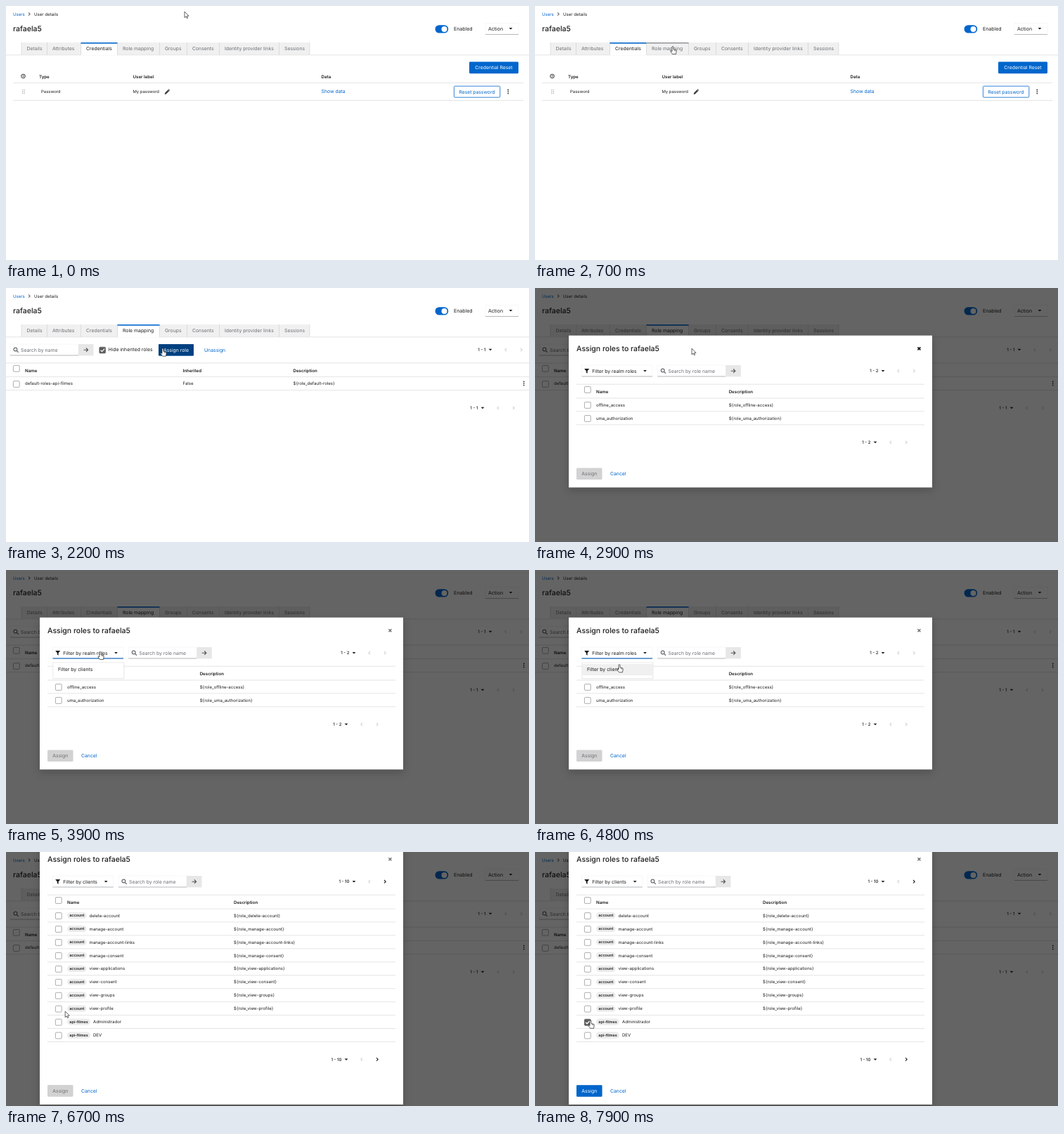
Recreate the animation shown at these times as an HTML page. Size 744x362 px, loop 8 s.

```html
<!DOCTYPE html>
<html lang="en">
<head>
<meta charset="utf-8">
<title>Assign roles</title>
<style>
  html, body { margin: 0; width: 100%; height: 100%; overflow: hidden; background: #fff; }
  svg { display: block; width: 100vw; height: 100vh; font-family: Inter, "Open Sans", sans-serif; }
  text { white-space: pre; text-rendering: geometricPrecision; }
  .sheet { filter: drop-shadow(0 4px 6px rgba(3, 3, 3, .2)); }
</style>
</head>
<body>
<svg id="stage" viewBox="0 0 744 362"></svg>
<script>
const INK = '#1c1c1c', GREY = '#6a6e73', LINE = '#d2d2d2', BLUE = '#0066cc';
const BODY = 6.87, SMALL = 6.05, TITLE = 10.5, PITCH = 18.95;
const USER = 'rafaela5', APP = 'api-filmes';

// Drawing helpers; y of text and icons is their vertical centre
const text = (x, y, s, size = BODY, fill = INK, weight = 400, anchor = 'start') =>
  `<text x="${x}" y="${y + size * .36}" font-size="${size}" fill="${fill}" font-weight="${weight}" text-anchor="${anchor}">${s}</text>`;
const rect = (x, y, w, h, fill, extra = '') =>
  `<rect x="${x}" y="${y}" width="${w}" height="${h}" fill="${fill}" ${extra}/>`;
const path = (d, stroke, width = 1, fill = 'none') =>
  `<path d="${d}" stroke="${stroke}" stroke-width="${width}" fill="${fill}"/>`;
const dot = (x, y, r, fill = INK) => `<circle cx="${x}" cy="${y}" r="${r}" fill="${fill}"/>`;
const group = (id, ...parts) => `<g id="${id}">${parts.join('')}</g>`;
const rule = (x1, x2, y, color = LINE, width = .6) => path(`M${x1} ${y}H${x2}`, color, width);
const head = (x, y, s) => text(x, y, s, 6.15, INK, 600);
const title = (x, y, s) => text(x, y, s, TITLE, INK, 500);
const caret = (x, y) => path(`M${x - 2.4} ${y - 1.2}h4.8l-2.4 2.5z`, 'none', 0, INK);
const chevron = (x, y, dir, color = LINE) =>
  path(`M${x - dir} ${y - 2.2}l${dir * 2.2} 2.2l${-dir * 2.2} 2.2`, color, 1.1);
const kebab = (x, y) => [-2.6, 0, 2.6].map(d => dot(x, y + d, .85)).join('');
const button = (x, y, w, label, fill = BLUE, color = '#fff') =>
  rect(x, y, w, 16.6, fill, 'rx="1.4"') + text(x + w / 2, y + 8.3, label, BODY, color, 400, 'middle');
const field = (x, y, w) =>
  rect(x, y, w, 16, '#fff', 'stroke="#f0f0f0" stroke-width=".6"') + rule(x, x + w, y + 16, '#8a8d90');
const checkbox = (x, y, on) =>
  rect(x - 4.4, y - 4.4, 8.8, 8.8, on ? '#5c5c5c' : '#fff', `rx="1.3" stroke="${on ? '#5c5c5c' : '#767676'}" stroke-width=".6"`) +
  (on ? path(`M${x - 2.7} ${y}l2 2l3.6-4`, '#fff', 1.3) : '');
const search = (x, y, hint) => field(x, y, 97) +
  `<circle cx="${x + 7.4}" cy="${y + 7.5}" r="2.4" fill="none" stroke="${GREY}" stroke-width="1.2"/>` +
  path(`M${x + 9.2} ${y + 9.3}l2.5 2.5`, GREY, 1.3) + text(x + 15, y + 8.2, hint, BODY, GREY) +
  rect(x + 97, y, 21.5, 16.4, '#e7e7e7') +
  path(`M${x + 104.5} ${y + 8.2}h6m-2.6-2.7l2.7 2.7l-2.7 2.7`, '#4f5255', 1.1);
const pager = (x, y, label, next) => text(x - 6.5, y, label, 6.1, INK, 500, 'end') + caret(x, y) +
  chevron(x + 22, y, -1) + chevron(x + 44, y, 1, next ? INK : LINE);

const tabX = [22, 58.5, 106.5, 158.5, 218.5, 257.5, 303.5, 388.5, 432];
const tabNames = ['Details', 'Attributes', 'Credentials', 'Role mapping', 'Groups', 'Consents', 'Identity provider links', 'Sessions'];
const tab = (i, active) => {
  const x = tabX[i], w = tabX[i + 1] - x;
  return rect(x, 52, w, active ? 18.2 : 17.4, active ? '#fff' : '#f0f0f0') +
    path(`M${x} 52v17.6M${x + w} 52v17.6`, LINE, .6) +
    (active ? rect(x, 52, w, 1.6, BLUE) : '') +
    text(x + 7.5, 61, tabNames[i], BODY, active ? INK : GREY);
};

const page = group('page',
  text(10, 11.5, 'Users', 6.1, BLUE), chevron(33, 11.5, 1, GREY), text(40, 11.5, 'User details', 6.1),
  title(10, 32.3, USER),
  rect(610.5, 27.2, 18.7, 11.4, BLUE, 'rx="5.7"'), dot(623.5, 32.9, 4, '#fff'), text(637, 32.8, 'Enabled', 7),
  field(682, 24.5, 47), text(686, 32.3, 'Action', 7), caret(718, 32.3),
  tabNames.map((_, i) => tab(i)).join(''), rule(0, 744, 69.8));

const credentials = group('credentials',
  tab(2, true), group('tabHover', rect(158.5, 52, 60, 1.4, '#8a8d90')),
  button(659, 79.6, 70, 'Credential Reset'),
  `<circle cx="24.5" cy="100" r="2.8" fill="none" stroke="${INK}" stroke-width=".9"/>`,
  text(24.5, 100, '?', 4.6, INK, 700, 'middle'),
  head(47, 101, 'Type'), head(180.5, 101, 'User label'), head(448.5, 101, 'Data'),
  rule(10, 736, 109.6), rule(10, 736, 134.5),
  [-2.4, 0, 2.4].map(d => dot(23.8, 122 + d, .65, '#999') + dot(26.2, 122 + d, .65, '#999')).join(''),
  text(50, 122.3, 'Password', 5.95), text(180.5, 122.3, 'My password', 5.9),
  path('M225.6 126l.6-2.3l4.4-4.4l1.7 1.7l-4.4 4.4z', 'none', 0, '#3c3f42'),
  path('M231 118.9l.5-.4l1.6 1.6l-.5 .5z', '#3c3f42', .6),
  text(448.5, 122, 'Show data', BODY, BLUE),
  rect(637.4, 114.2, 65.4, 16, '#fff', `rx="1.4" stroke="${BLUE}" stroke-width=".8"`),
  text(670, 122.2, 'Reset password', 6.75, BLUE, 400, 'middle'), kebab(714.3, 122));

const roles = group('roles',
  tab(3, true),
  search(6, 80, 'Search by name'), checkbox(137.2, 88.6, true), text(145.5, 87.5, 'Hide inherited roles'),
  button(217, 80, 50, 'Assign role'), group('assignHover', button(217, 80, 50, 'Assign role', '#004080')),
  text(282, 88.3, 'Unassign', BODY, BLUE), pager(689, 88, '1 - 1'),
  rule(0, 744, 107), rule(0, 744, 126.6), rule(0, 744, 145.6),
  checkbox(14.8, 114.8), head(27, 117.8, 'Name'), head(251.5, 117.8, 'Inherited'), head(408.5, 117.8, 'Description'),
  checkbox(14.8, 137), text(27, 136, 'default-roles-' + APP, SMALL), text(251.5, 136, 'False', SMALL),
  text(408.5, 136, '${role_default-roles}', SMALL), kebab(736.7, 136), pager(678, 171, '1 - 1'));

const cross = (id, color, width) => group(id, path('M544.4 84.3l4 4m0-4l-4 4', color, width));

// Each row: [name, description, badge, badge width]
function modal(id, dy, filter, filterEnd, descX, rows, range, extra = '') {
  const low = (rows.length - 2) * PITCH, many = rows.length > 2;
  const body = rows.map(([name, desc, badge, width], i) => {
    const y = 166.5 + i * PITCH;
    return checkbox(74.8, y + .5) + rule(59, 554, y + 9.4) +
      (badge ? rect(87, y - 4.6, width, 9.2, '#ececec', 'rx="4.6"') +
        text(87 + width / 2, y, badge, 5.4, INK, 600, 'middle') : '') +
      text(badge ? 91 + width : 87, y, name, SMALL) +
      (desc ? text(descX, y, '${role_' + desc + '}', SMALL) : '');
  }).join('');
  return `<g id="${id}" transform="translate(0 ${dy})">` +
    rect(48, 67.7, 517, 216.6 + low, '#fff', 'class="sheet"') + title(59, 86, 'Assign roles to ' + USER) +
    (many ? cross('', GREY, 1.3) : cross('crossFocus', INK, 1.7) + cross('crossIdle', GREY, 1.3)) +
    field(66.5, 110, filterEnd - 66.5) +
    path('M70.2 115h7l-2.6 3.3v3.4l-1.8-1.2v-2.2z', 'none', 0, INK) +
    text(81.3, 118.2, filter, 6.8) + caret(filterEnd - 10.5, 118.2) +
    search(filterEnd + 7.3, 110, 'Search by role name') + pager(495, 118.2, range, many) +
    rule(59, 554, 137.2) + checkbox(74.8, 145) + head(87, 148, 'Name') + head(descX, 148, 'Description') +
    rule(59, 554, 157) + body + pager(484, 220 + low, range, many) +
    button(59, 256.5 + low, 36.5, 'Assign', LINE, GREY) + text(107, 264.8 + low, 'Cancel', BODY, BLUE) +
    extra + '</g>';
}

const menu = group('menu',
  rect(66.5, 131.5, 102, 24, '#000', 'opacity=".07"'), rect(67, 132, 100.8, 22.6, '#fff', 'stroke="#e2e2e2" stroke-width=".5"'),
  group('itemHover', rect(67, 133.8, 100.8, 16.4, '#f0f0f0')), text(74, 141.6, 'Filter by clients', 6.9));

const account = ['delete-account', 'manage-account', 'manage-account-links', 'manage-consent',
  'view-applications', 'view-consent', 'view-groups', 'view-profile'];
const realmRows = [['offline_access', 'offline-access'], ['uma_authorization', 'uma_authorization']];
const clientRows = [...account.map(n => [n, n, 'account', 27.6]),
  ...['Administrador', 'DEV'].map(n => [n, '', APP, 33])];

const stage = document.getElementById('stage');
stage.innerHTML = page + credentials + roles +
  group('shade', rect(0, 0, 744, 362, '#030303', 'opacity=".61"')) +
  modal('realm', 0, 'Filter by realm roles', 167, 275.7, realmRows, '1 - 2',
    group('filterFocus', rule(66.5, 167, 126, BLUE, 1.2)) + menu) +
  modal('clients', -76, 'Filter by clients', 152.7, 324, clientRows, '1 - 10') +
  group('pressed', rect(70.4, 238.4, 8.8, 8.8, '#cfcfcf', 'rx="1.3" stroke="#5c5c5c" stroke-width=".6"')) +
  group('checked', checkbox(74.8, 242.8, true)) +
  group('assignOn', button(59, 332.2, 36.5, 'Assign')) +
  group('arrow', path('M0 0V8.6L2 6.8L3.4 9.6L4.7 9L3.4 6.3L6 6.1Z', '#222', .7, '#fff')) +
  group('hand', path('M-1 6.4V.9A1 1 0 0 1 1 .9V4.2L4 4.8Q5.4 5.2 5.2 6.6L4.5 11H-.4L-3 7.4Q-3.1 6.1-2 6.3L-1 7.2Z', '#222', .7, '#fff') +
    path('M2.4 4.8v1.8M3.9 5.2v1.6', '#222', .5));

const parts = Object.fromEntries([...stage.querySelectorAll('g[id]')].map(g => [g.id, g]));
const show = (id, on) => { parts[id].style.display = on ? '' : 'none'; };

// Pointer legs: start, end, destination
const home = [254, 8];
const legs = [[0, 700, 196, 57.6], [1600, 2200, 223, 86.2], [3000, 3700, 134, 116.6],
  [4300, 4800, 120, 134.8], [6000, 6900, 79, 240.3]];
const ease = p => p * p * (3 - 2 * p);
function pointer(t) {
  let [x, y] = home;
  for (const [start, end, toX, toY] of legs) {
    const p = ease(Math.min(1, Math.max(0, (t - start) / (end - start))));
    x += (toX - x) * p;
    y += (toY - y) * p;
  }
  return [x, y];
}

function draw(now) {
  const t = Math.floor(now % 8000 / 100) * 100;
  const [x, y] = pointer(t);
  const onRoles = t >= 1100, open = t >= 2900, clients = t >= 5500;
  const overTab = !open && y > 52 && y < 70;
  const overAssign = !open && x > 217 && y > 80;
  const overFilter = open && !clients && x < 167 && y > 110;
  show('credentials', !onRoles);
  show('roles', onRoles);
  show('tabHover', overTab);
  show('assignHover', overAssign);
  show('shade', open);
  show('realm', open && !clients);
  show('clients', clients);
  show('crossFocus', t < 3700);
  show('crossIdle', t >= 3700);
  show('filterFocus', overFilter);
  show('menu', t >= 3900);
  show('itemHover', y > 133.8);
  show('pressed', t >= 7500 && t < 7800);
  show('checked', t >= 7800);
  show('assignOn', t >= 7800);
  parts.assignOn.style.opacity = t < 7900 ? .5 : 1;
  const hand = overTab || overAssign || overFilter || (clients && x < 80 && y > 238);
  show('hand', hand);
  show('arrow', !hand);
  parts[hand ? 'hand' : 'arrow'].setAttribute('transform', `translate(${x} ${y})`);
}

const begin = performance.now();
(function tick() {
  draw(performance.now() - begin);
  requestAnimationFrame(tick);
})();
</script>
</body>
</html>
```
